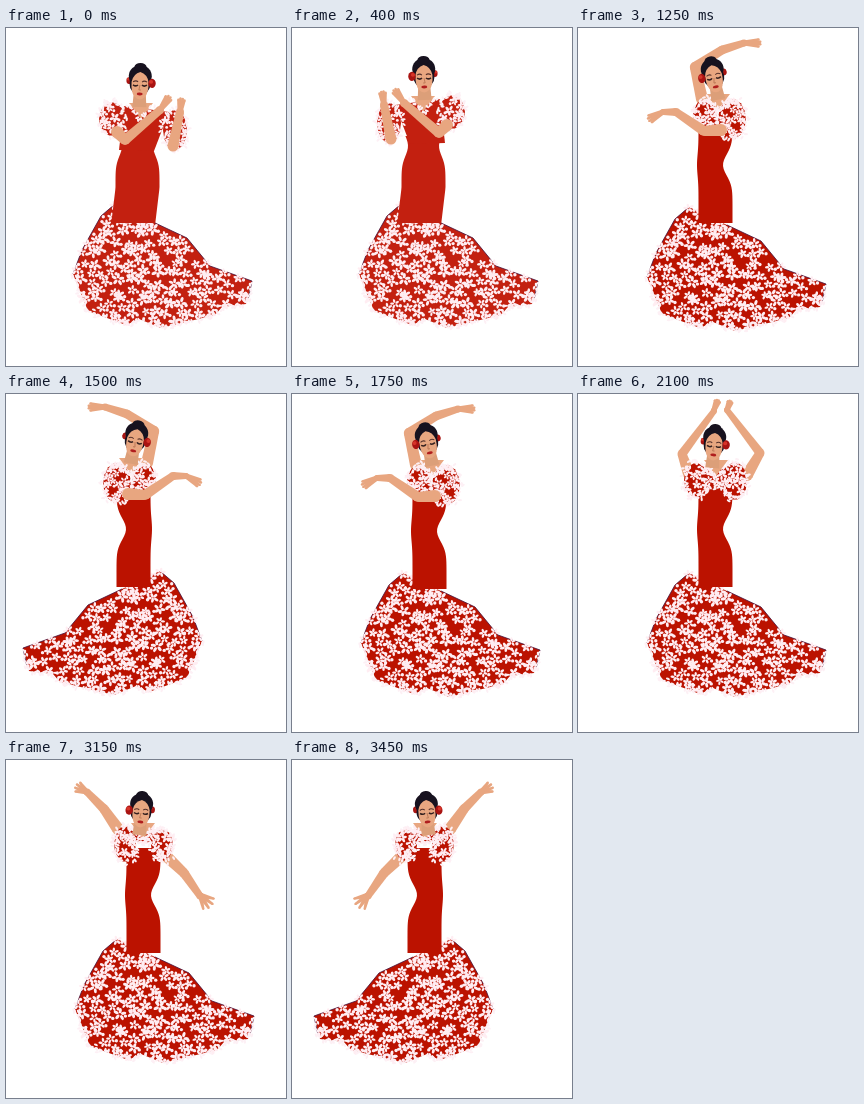
An HTML page with a canvas that plays this animation: 280x338 px, repeating every 3.75 s.

```html
<!DOCTYPE html>
<html lang="en">
<head>
<meta charset="utf-8">
<title>Flamenco dancer</title>
<style>
html, body { margin: 0; width: 100%; height: 100%; overflow: hidden; background: #fff; }
canvas { display: block; width: 280px; height: 338px; }
</style>
</head>
<body>
<canvas id="stage"></canvas>
<script>
const canvas = document.getElementById('stage');
const ctx = canvas.getContext('2d');
const ratio = window.devicePixelRatio || 1;
canvas.width = 280 * ratio;
canvas.height = 338 * ratio;

const SKIN = '#e8a680', SHADE = '#dc9f79', LACE = '#ffedf2', FRILL = '#fdf0f5', HAIR = '#17121f';
let red = '#bb1200';

// Key points of the skirt: left hip, hem, train, right hip.
const SKIRT = [[109,176],[95,188],[76,222],[67,246],[82,283],[120,297],[133,291],[155,300],
  [209,287],[216,279],[240,276],[246,253],[204,238],[181,210],[147,194]];

function seeded(seed) {
  return () => {
    seed = (seed * 1664525 + 1013904223) >>> 0;
    return seed / 4294967296;
  };
}

function polygon(points) {
  const path = new Path2D();
  points.forEach(([x, y]) => path.lineTo(x, y));
  path.closePath();
  return path;
}

function fill(path, color) {
  ctx.fillStyle = color;
  ctx.fill(typeof path === 'string' ? new Path2D(path) : path);
}

function line(d, color, width) {
  ctx.strokeStyle = color;
  ctx.lineWidth = width;
  ctx.stroke(new Path2D(d));
}

function oval(x, y, rx, ry, color, turn = 0) {
  ctx.beginPath();
  ctx.ellipse(x, y, rx, ry, turn, 0, Math.PI * 2);
  ctx.fillStyle = color;
  ctx.fill();
}

function transformed(scaleX, dx, dy, draw) {
  ctx.save();
  ctx.translate(dx, dy);
  ctx.scale(scaleX, 1);
  draw();
  ctx.restore();
}
const at = (dx, dy, draw) => transformed(1, dx, dy, draw);
const mirror = (sum, dy, draw) => transformed(-1, sum, dy, draw);

function blossom(x, y, size, random) {
  const turn = random() * 6;
  for (let i = 0; i < 5; i++) {
    const a = turn + i * 1.26, reach = size * (0.4 + random() * 0.25);
    oval(x + Math.cos(a) * reach, y + Math.sin(a) * reach, size * 0.42, size * 0.24, LACE, a);
  }
}

// Scatters blossoms and dots over a jittered lattice inside the polygon.
function print(points, gap, size, seed) {
  const random = seeded(seed), path = polygon(points);
  const xs = points.map(p => p[0]), ys = points.map(p => p[1]);
  const inside = (x, y) => {
    ctx.save();
    ctx.resetTransform();
    const hit = ctx.isPointInPath(path, x, y);
    ctx.restore();
    return hit;
  };
  let row = 0;
  for (let y = Math.min(...ys); y < Math.max(...ys); y += gap * 0.88, row++) {
    for (let x = Math.min(...xs) + (row % 2) * gap / 2; x < Math.max(...xs); x += gap) {
      const px = x + (random() - 0.5) * gap * 0.7, py = y + (random() - 0.5) * gap * 0.7;
      if (inside(px, py)) blossom(px, py, size * (0.8 + random() * 0.4), random);
      if (inside(px + gap / 2, py + 2)) oval(px + gap / 2, py + 2, size * 0.3, size * 0.3, LACE);
    }
  }
}

function frill(points, spread, seed) {
  const random = seeded(seed);
  for (let i = 1; i < points.length; i++) {
    const [ax, ay] = points[i - 1], [bx, by] = points[i];
    const count = Math.ceil(Math.hypot(bx - ax, by - ay) / 2);
    for (let k = 0; k < count; k++) {
      const t = k / count;
      oval(ax + (bx - ax) * t + (random() - 0.5) * spread, ay + (by - ay) * t + (random() - 0.5) * spread,
        2.1, 1.1, FRILL, random() * 3);
    }
  }
}

function puff(x, y, rx, ry) {
  const ring = [];
  for (let a = 0; a < 6.4; a += Math.PI / 7) {
    ring.push([x + Math.cos(a) * rx, y + Math.sin(a) * ry]);
  }
  fill(polygon(ring), red);
  frill(ring, 7, x);
  print(ring, 8.5, 4.8, x + y);
}

// A column of cloth whose centre shifts and narrows around the waist.
function torso({ top, bottom, center, half, waist, pinch, sway, reach, lean = 0 }) {
  const left = [], right = [];
  for (let y = top; y <= bottom; y += 3) {
    const bell = Math.exp(-(((y - waist) / reach) ** 2));
    const x = center - sway * bell - lean * Math.max(0, y - 160), w = half - pinch * bell;
    left.push([x - w, y]);
    right.unshift([x + w, y]);
  }
  fill(polygon([...left, ...right]), red);
}

// Tapers evenly from the first joint to the last.
function limb(from, to, ...joints) {
  joints.forEach(([x, y], i) => {
    const w = from + (to - from) * i / (joints.length - 1);
    oval(x, y, w / 2, w / 2, SKIN);
    if (!i) return;
    const [px, py] = joints[i - 1], pw = w - (to - from) / (joints.length - 1);
    const a = Math.atan2(y - py, x - px) + Math.PI / 2, c = Math.cos(a) / 2, s = Math.sin(a) / 2;
    fill(polygon([[px + c * pw, py + s * pw], [x + c * w, y + s * w],
      [x - c * w, y - s * w], [px - c * pw, py - s * pw]]), SKIN);
  });
}

function hand(x, y, angle, length, spread) {
  for (let i = -1.5; i <= 1.5; i++) {
    const a = angle + i * spread, r = length * (1 - Math.abs(i) * 0.08);
    limb(5, 2.4, [x, y], [x + Math.cos(a) * r, y + Math.sin(a) * r]);
  }
}

function rose(x, y, r) {
  oval(x, y, r, r * 1.25, '#a91412');
  oval(x - 1, y - 1.5, r * 0.55, r * 0.5, '#d63429');
}

function head(x, y, tilt, side = -1) {
  ctx.save();
  ctx.translate(x, y);
  ctx.rotate(tilt);
  fill('M-6 8L6 8L7 22L-7 22Z', SHADE);
  rose(-side * 11, -4, 2.7);
  oval(0, -9, 11.5, 11, HAIR);
  oval(0, -18, 6, 4, HAIR);
  oval(0, -1, 10.5, 11, HAIR);
  fill('M-8.5 -3Q-7 -11 0 -13Q7 -11 8.5 -3Q9 8 5 12Q0 17 -5 12Q-9 8 -8.5 -3Z', SKIN);
  line('M-7 -3Q-4 -5 -2 -3M2 -3Q4 -5 7 -3', '#54302b', 1);
  line('M-7 0Q-4 2 -2 0M2 0Q4 2 7 0', '#33201f', 1.5);
  line('M0 0L-1 5L1 5', '#b3704f', 0.8);
  oval(0, 9, 3, 1.4, '#b01e1e');
  rose(side * 12, -2, 3.7);
  ctx.restore();
}

function neckline(x, y) {
  fill(polygon([[x - 12, y], [x + 12, y], [x, y + 16]]), SKIN);
  frill([[x - 13, y + 3], [x, y + 17], [x + 14, y + 3]], 5, x);
}

function skirt() {
  fill(polygon(SKIRT), red);
  line('M147 194L181 210L204 238L246 253L242 272M109 176L95 188L76 222L67 246', '#43103a', 0.8);
  frill(SKIRT.slice(3, 12), 6, 71);
  print(SKIRT, 11, 5.6, 19);
}

function clapTop(closed) {
  fill('M113 122L118 78L163 84L148 123Z', red);
  neckline(135, 75);
  puff(106, 91, 13, 17);
  puff(169, 102, 12, 20);
  head(134, 57, 0.03, 1);
  const x = closed ? 170 : 174;
  limb(11, 8, [167, 118], [x, 84]);
  hand(x, 84, -1.45, 14, 0.17);
  limb(12, 8, [111, 104], [119, 112], [154, 82]);
  hand(154, 82, -0.95, 17, 0.15);
}

function clap(left, closed) {
  red = '#c32010';
  skirt();
  torso({ top: 108, bottom: 195, center: 131.5, half: 22, waist: 118, pinch: 6.5, sway: 0, reach: 14, lean: 0.12 });
  if (left) mirror(266, -7, () => clapTop(closed));
  else clapTop(closed);
}

function slimTorso() {
  torso({ top: 86, bottom: 192, center: 133.5, half: 17, waist: 133, pinch: 4, sway: 5.5, reach: 15 });
}

function sway() {
  red = '#bb1200';
  at(-2, -1, skirt);
  limb(12, 7, [120, 67], [113, 35], [140, 18], [162, 11]);
  hand(162, 11, 0, 17, 0.16);
  slimTorso();
  puff(123, 82, 12, 14);
  puff(150, 87, 14, 20);
  neckline(136, 62);
  head(132, 46, -0.2);
  limb(12, 6, [139, 98], [122, 99], [94, 80], [81, 80]);
  hand(81, 80, 2.65, 17, 0.17);
}

function fittedBody() {
  red = '#bb1200';
  at(2, 3, skirt);
  at(4, 2, slimTorso);
}

function overhead(spread) {
  fittedBody();
  limb(12, 6, [111, 80], [104, 60], [136, 17]);
  limb(12, 6, [169, 81], [182, 59], [149, 16]);
  hand(136, 16, spread ? -0.4 : -1.2, spread ? 18 : 11, 0.18);
  hand(149, 16, spread ? -2.75 : -1.2, spread ? 18 : 10, 0.18);
  puff(118, 86, 12, 17);
  puff(157, 87, 12, 19);
  puff(138, 82, 15, 11);
  neckline(138, 66);
  head(136, 52, 0.08, 1);
}

function openArms() {
  fittedBody();
  limb(12, 7, [158, 94], [178, 113], [194, 136]);
  hand(194, 135, 0.8, 16, 0.36);
  limb(12, 7, [112, 69], [98, 49], [81, 32]);
  hand(81, 32, -2.65, 13, 0.3);
  puff(119, 84, 11, 18);
  puff(156, 85, 11, 16);
  puff(137, 75, 14, 8);
  neckline(137, 63);
  head(135, 53, 0.07);
}

const beats = [];
let loop = 0;
function hold(duration, draw) {
  beats.push({ from: loop, draw });
  loop += duration;
}

for (let i = 0; i < 8; i++) hold(100, () => clap(i > 3, i % 2 === 1));
[200, 250, 250, 250, 100].forEach((duration, i) => {
  const drop = i ? 4 : 0;
  hold(duration, i % 2 ? () => mirror(261, i - 1, sway) : () => at(drop, drop, sway));
});
for (let i = 0; i < 8; i++) {
  const pose = () => overhead(i % 2 === 0);
  hold(i ? 150 : 250, i < 4 ? pose : () => mirror(268, 0, pose));
}
hold(300, openArms);
hold(300, () => mirror(270, 0, openArms));

const start = performance.now();
let shown = null;

function render() {
  const time = (performance.now() - start) % loop;
  const beat = beats.findLast(({ from }) => from <= time);
  if (beat !== shown) {
    shown = beat;
    ctx.setTransform(ratio, 0, 0, ratio, 0, 0);
    ctx.fillStyle = '#fff';
    ctx.fillRect(0, 0, 280, 338);
    beat.draw();
  }
  requestAnimationFrame(render);
}
render();
</script>
</body>
</html>
```
